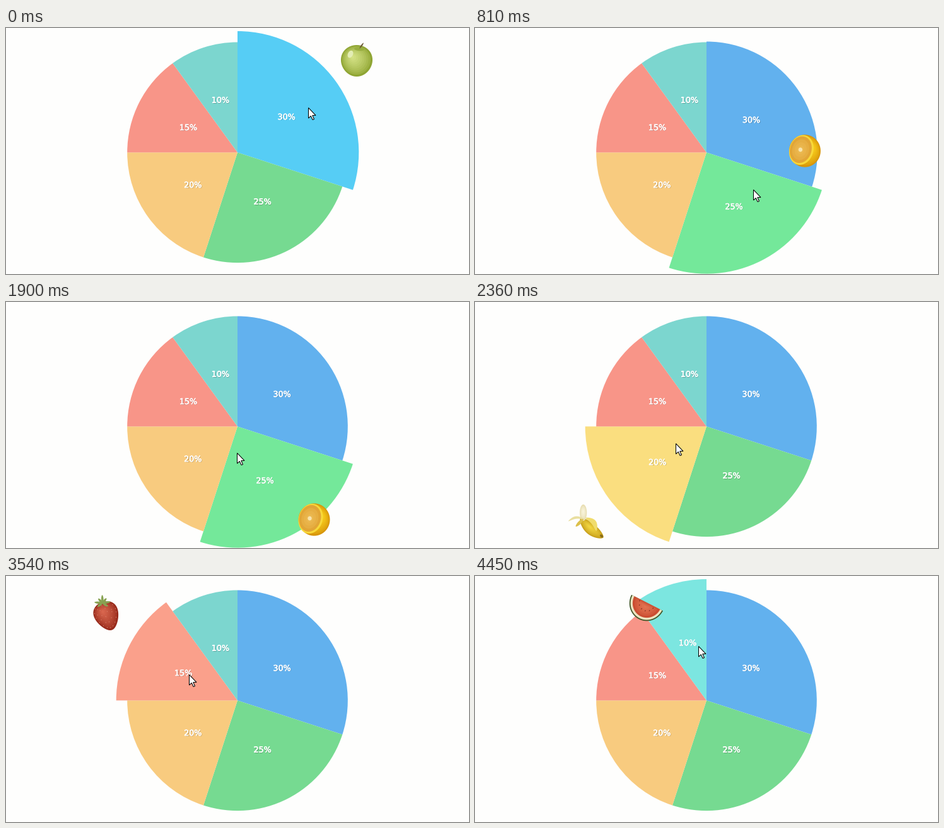
A matplotlib script that plays this animation: 734 by 390 pixels, repeating every 5090 ms.

```python
import numpy as np
import matplotlib.pyplot as plt
from matplotlib.animation import FuncAnimation
from matplotlib.collections import PolyCollection
from matplotlib.colors import to_rgb
from matplotlib.patches import Polygon, Wedge
from matplotlib.patheffects import withStroke
from matplotlib.transforms import Affine2D

W, H, DPI = 734, 390, 100
CENTER = np.array([367, 197.3])
R, R_HOVER = 174.8, 192.3
LAST_STEP = 49

# share, colour, hover colour, step when hovered, resting spot of its fruit
SLICES = [
    (30, "#62b1ee", "#56cdf5", -9, (556, 50.5)),
    (25, "#76da91", "#74e89a", 7.77, (488.5, 345)),
    (20, "#f8cb7f", "#fade7f", 21.9, (175, 347)),
    (15, "#f89588", "#faa08b", 32, (159, 59)),
    (10, "#7cd6cf", "#7ce6e0", 42.8, (271, 51)),
]
SHARES, COLORS, HOVER_COLORS, HOVER_AT, SPOTS = zip(*SLICES)
SPOTS = np.array(SPOTS)

# step, x, y of the pointer tip
POINTER_PATH = [(1, 479, 126), (9, 441, 256), (16, 414, 254), (26, 318, 224),
                (32, 292, 194), (33, 289, 169), (39, 290, 156), (49, 354, 111)]
ARROW = np.array([(0, 0), (0, 16.5), (3.8, 13), (6.6, 19), (9, 18),
                  (6.3, 12), (11.5, 12)])


def ease_out(t, power):
    return 1 - (1 - np.clip(t, 0, 1)) ** power


def turned(u, v, x, y, angle):
    a = np.radians(angle)
    return np.column_stack([x + u * np.cos(a) - v * np.sin(a),
                            y + u * np.sin(a) + v * np.cos(a)])


def egg(x, y, rx, ry, angle=0, taper=0, arc=360):
    """Ellipse, or part of one, narrowed towards its lower end."""
    t = np.radians(np.linspace(0, arc, 48))
    return turned(rx * np.cos(t) * (1 - taper * np.sin(t)), ry * np.sin(t), x, y, angle)


def petal(x, y, angle, length, width, bend=0):
    """Pointed leaf starting at x, y, with a bowed spine."""
    t = np.linspace(0, 1, 24)
    spine, half = bend * np.sin(np.pi * t), width * np.sin(np.pi * t).clip(0) ** 0.6
    u = length * np.concatenate([t, t[::-1]])
    v = np.concatenate([spine + half, (spine - half)[::-1]])
    return turned(u, v, x, y, angle)


def shaded(shape, dark, light, focus, layers=10):
    """Nested copies of a shape, fading from its rim to a bright focus."""
    a, b = np.array(to_rgb(dark)), np.array(to_rgb(light))
    return [(focus + (shape - focus) * (1 - 0.9 * k), a + (b - a) * k ** 0.7)
            for k in np.linspace(0, 1, layers)]


def apple():
    return (shaded(egg(0, 1.5, 25, 25, taper=0.06), "#8fa533", "#d3e184", (-7, -5))
            + [(egg(4, -17, 8, 2.6, 5), "#98ae40"),
               (egg(-10, -9, 4, 6, 25), "#e3edb4"),
               (petal(4.5, -18, -55, 11, 1.1), "#6b5a35")])


def orange():
    return (shaded(egg(0, 0, 25, 25.7), "#d8960a", "#fbd21c", (12, -6))
            + [(egg(-5.5, -1.5, 19, 24, 17), "#f8d83a")]
            + shaded(egg(-6.5, -2, 17, 21.5, 17), "#e2a536", "#edbc55", (-7, -2), 5)
            + [(egg(-7, -2, 3.2, 3.4), "#f8e4ac")])


def banana():
    return (shaded(petal(-9, -4, 40, 48, 9, 2), "#c79e19", "#f2d641", (6, 9))
            + shaded(egg(-4, -13, 5.6, 13), "#e9dfb4", "#faf5de", (-4, -15), 5)
            + [(petal(-3, -3, 172, 25, 2, 4), "#e9dfa0"),
               (petal(-4, -3, 135, 17, 2.5), "#dcc04a"),
               (petal(0, -5, 51, 27, 4, -5), "#f0dc6c"),
               (egg(25, 24, 3, 2, 40), "#8a6d18")])


def strawberry():
    body, focus = egg(1, 4.5, 19, 23.5, -20, taper=0.28), np.array([-6, -3])
    parts = shaded(body, "#982a1b", "#d8664e", focus)
    for ring in (0.3, 0.6, 0.87):
        for x, y in (focus + (body - focus) * ring)[::int(3 / ring)]:
            parts.append((egg(x, y, 0.5, 0.8), "#dc8670"))
    parts += [(petal(-6, -16, angle, 13 - 3 * (angle % 2), 1.8), "#87a252")
              for angle in range(-215, 40, 41)]
    return parts


def melon():
    hub = np.array([2, -8.5])

    def cut(k):
        return egg(*hub, 28 * k, 29 * k, 27, arc=180)

    parts = [(cut(1), "#3f5426"), (cut(0.94), "#ece4c0")]
    parts += shaded(cut(0.82), "#cb4d32", "#e27452", hub + (-3, 6), 6)
    return parts + [(egg(x, y, 0.6, 1.1, 30), "#7c2c20")
                    for x, y in cut(0.45)[4::8]]


fig = plt.figure(figsize=(W / DPI, H / DPI), dpi=DPI, facecolor="#fefefd")
ax = fig.add_axes([0, 0, 1, 1])
ax.set_xlim(0, W)
ax.set_ylim(H, 0)
ax.axis("off")

edges = -90 + 3.6 * np.cumsum((0,) + SHARES)
middle = np.radians((edges[:-1] + edges[1:]) / 2)
directions = np.column_stack([np.cos(middle), np.sin(middle)])

wedges, labels = [], []
for i, share in enumerate(SHARES):
    wedges.append(ax.add_patch(
        Wedge(CENTER, R, edges[i], edges[i + 1], fc=COLORS[i], ec="none", lw=0)))
    style = dict(ha="center", va="baseline", family="DejaVu Sans",
                 fontsize=12.7 * 72 / DPI, zorder=3)
    shadow = ax.text(0, 0, f"{share}%", color="black", alpha=0.22, **style)
    front = ax.text(0, 0, f"{share}%", color="white", **style,
                    path_effects=[withStroke(linewidth=0.35, foreground="white")])
    labels.append((shadow, front))

shift = Affine2D()
fruits = []
for make in (apple, orange, banana, strawberry, melon):
    shapes, fills = zip(*make())
    fruit = PolyCollection(shapes, facecolors=[to_rgb(c) for c in fills],
                           edgecolors="none", linewidths=0, zorder=4)
    fruit.set_transform(shift + ax.transData)
    fruits.append(ax.add_collection(fruit, autolim=False))

pointer = ax.add_patch(Polygon(ARROW, fc="white", ec="black", lw=0.75,
                               joinstyle="miter", zorder=5))


def swell(i, step):
    """How far a slice stands out: it pops up fast and sinks back slower."""
    up = ease_out((step - HOVER_AT[i]) / 1.1, 3)
    if i + 1 == len(SLICES):
        return up
    return up - ease_out((step - HOVER_AT[i + 1]) / 2, 3)


def update(tick):
    # the picture advances 11 times a second
    step = min((11 * tick + 10) // 100, LAST_STEP)
    active = sum(step >= t for t in HOVER_AT) - 1

    for i, (wedge, (shadow, front)) in enumerate(zip(wedges, labels)):
        radius = R + (R_HOVER - R) * swell(i, step)
        wedge.set_radius(radius)
        wedge.set_facecolor(HOVER_COLORS[i] if i == active else COLORS[i])
        x, y = CENTER + directions[i] * radius / 2
        shadow.set_position((x + 1, y + 5.4))
        front.set_position((x, y + 4.4))

    p = ease_out((step - HOVER_AT[active]) / 4.3, 2)
    start = SPOTS[max(active - 1, 0)]
    shift.clear().translate(*(start + (SPOTS[active] - start) * p))
    for i, fruit in enumerate(fruits):
        fruit.set_visible(i == active)

    steps, xs, ys = zip(*POINTER_PATH)
    tip = np.round([np.interp(step, steps, xs), np.interp(step, steps, ys)])
    pointer.set_xy(ARROW + tip + 0.5)
    return [*wedges, *fruits, pointer]


anim = FuncAnimation(fig, update, frames=509, interval=10, repeat=True,
                     repeat_delay=0, blit=False)
plt.show()
```
